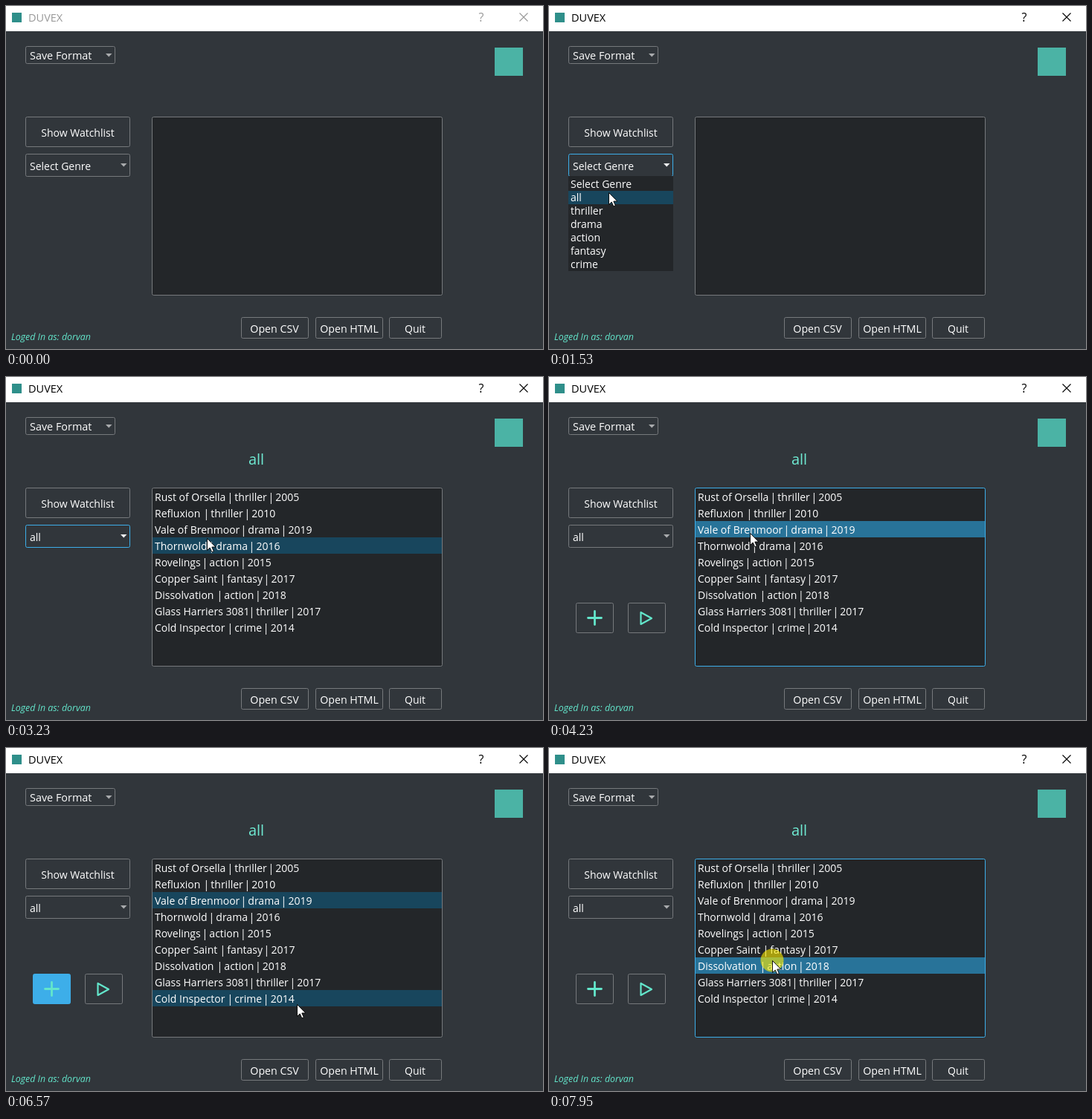
An HTML page for the animation above (8 s loop, 722 by 462 pixels).

```html
<!DOCTYPE html>
<html lang="en">
<head>
<meta charset="utf-8">
<title>Watchlist</title>
<style>
html, body { margin: 0; width: 100%; height: 100%; overflow: hidden; background: #31363b; }
svg { display: block; }
#stage { width: 100vw; height: 100vh; }
text { font: 14px "Open Sans", "Noto Sans", sans-serif; fill: #fff; white-space: pre; }
.mid { text-anchor: middle; }
.open { font-size: 14.2px; }
.box { fill: #31363b; stroke: #76797c; }
.box.hot { stroke: #3daee9; }
.box.on { fill: #3daee9; stroke: #3daee9; }
.dark { fill: #232629; }
.arrow { fill: #a9abad; }
.hot + .arrow { fill: #eff0f1; }
.icon { fill: none; stroke: #63e6cb; stroke-linecap: round; stroke-linejoin: round; }
#bar text { fill: #000; }
#bar path { fill: none; stroke: #000; stroke-width: 1.1; }
#bar.idle text { fill: #999; }
#bar.idle path { stroke: #999; }
</style>
</head>
<body>
<svg id="stage" viewBox="0 0 722 462">
  <rect width="722" height="462" fill="#31363b"/>
  <g id="bar">
    <rect width="722" height="34" fill="#fff"/>
    <rect x="8" y="9" width="13" height="13" fill="#2f8f8a"/>
    <text x="30" y="21" style="font-size:14.5px">DUVEX</text>
    <text class="mid" x="639" y="21" style="font-size:16px">?</text>
    <path d="M690.5 9.5l11 11m0-11l-11 11"/>
  </g>
  <rect x="657" y="56" width="38" height="38" fill="#4bb3a5"/>

  <rect class="box" x="26.5" y="54.5" width="120" height="23" rx="2"/>
  <path class="arrow" d="M134 64h8.5l-4.25 4.5z"/>
  <text x="32" y="72" style="font-size:14.4px">Save Format</text>
  <rect class="box" x="26.5" y="149.5" width="140" height="40" rx="2"/>
  <text class="mid" x="96.5" y="176">Show Watchlist</text>
  <rect class="box" id="combo" x="26.5" y="199.5" width="140" height="30" rx="2"/>
  <path class="arrow" d="M154 212h8.5l-4.25 4.5z"/>
  <text id="genre" x="32" y="221">Select Genre</text>

  <text class="mid" id="heading" x="336.5" y="118" style="font-size:20px;fill:#6febd3">all</text>
  <rect class="box" id="list" x="196.5" y="149.5" width="390" height="240" rx="2" style="fill:#232629"/>
  <g id="rows"></g>

  <g id="tools">
    <rect class="box" id="plus" x="36.5" y="304.5" width="50" height="40" rx="2"/>
    <path class="icon" stroke-width="2.8" d="M52.5 324.5h18m-9-9v18"/>
    <rect class="box" x="106.5" y="304.5" width="50" height="40" rx="2"/>
    <path class="icon" stroke-width="2.2" d="M123.5 317v16l14.5-8z"/>
  </g>

  <rect class="box" id="csv" x="316.5" y="419.5" width="90" height="28" rx="2"/>
  <text class="mid open" x="361" y="440">Open CSV</text>
  <rect class="box" x="416.5" y="419.5" width="90" height="28" rx="2"/>
  <text class="mid open" x="461.5" y="440">Open HTML</text>
  <rect class="box" x="515.5" y="419.5" width="70" height="28" rx="2"/>
  <text class="mid" x="550" y="440">Quit</text>
  <text x="7" y="450" style="font-size:12.4px;font-style:italic;fill:#63e6cb">Loged In as: dorvan</text>

  <svg id="popup" x="26" y="229" width="141" height="128">
    <rect class="dark" width="141" height="128"/>
    <g id="items"></g>
  </svg>
  <g id="cursor">
    <circle id="ring" r="15.5" fill="#ffee00" fill-opacity=".6"/>
    <path d="M.5 .5V16.5L4.2 13 6.8 18.8 9.3 17.7 6.8 12H11.8Z" fill="#fff" stroke="#000" stroke-width=".9"/>
  </g>
</svg>
<script>
const LOOP = 8000;
const $ = id => document.getElementById(id);

// title, genre, year, x of the first separator
const films = [
  ['Rust of Orsella', 'thriller', 2005, 301],
  ['Refluxion', 'thriller', 2010, 269],
  ['Vale of Brenmoor', 'drama', 2019, 319],
  ['Thornwold', 'drama', 2016, 276],
  ['Rovelings', 'action', 2015, 267],
  ['Copper Saint', 'fantasy', 2017, 291],
  ['Dissolvation', 'action', 2018, 287],
  ['Glass Harriers 3081', 'thriller', 2017, 330],
  ['Cold Inspector', 'crime', 2014, 301]
];
const genres = ['Select Genre', 'all', 'thriller', 'drama', 'action', 'fantasy', 'crime'];

$('rows').innerHTML = films.map(([title, genre, year, x], i) => {
  const top = 150 + 22 * i;
  return `<rect x="197" y="${top}" width="389" height="22"/>` +
    `<text x="200" y="${top + 17}">${title}</text>` +
    `<text x="${x - 3.5}" y="${top + 17}">|<tspan dx="-1.5"> ${genre} </tspan>` +
    `<tspan dx="-2">|</tspan><tspan dx="-1.5"> ${year}</tspan></text>`;
}).join('');
$('items').innerHTML = genres.map((g, i) =>
  `<rect y="${18 * i}" width="141" height="18"/><text x="3" y="${18 * i + 14}">${g}</text>`).join('');
const rowBars = $('rows').querySelectorAll('rect');
const itemBars = $('items').querySelectorAll('rect');

// start, end, steps, from, bend, to
const moves = [
  [120, 750, 9, [472, 411], [230, 250], [91, 225]],
  [1150, 1680, 8, [91, 225], [88, 246], [77, 254]],
  [2460, 3230, 11, [77, 254], [180, 252], [270, 217]],
  [3690, 3840, 3, [270, 217], [270, 213], [270, 210]],
  [4610, 5070, 7, [270, 210], [190, 250], [67, 332]],
  [6020, 6570, 8, [67, 332], [180, 318], [391, 345]],
  [7030, 7270, 4, [391, 345], [385, 400], [362, 426]],
  [7340, 7720, 6, [362, 426], [320, 350], [300, 286]]
];
const clicks = [[900, 990], [1760, 1840], [4150, 4230], [5470, 5620], [7870, LOOP]];

const ease = u => u * u * (3 - 2 * u);
const within = (t, a, b) => t >= a && t < b;
const show = (id, on) => { $(id).style.display = on ? '' : 'none'; };
const mark = (id, name, on) => $(id).classList.toggle(name, on);

// The pointer moves in steps, like a screen recording.
function pointer(t) {
  let move = moves[0];
  for (const m of moves) if (t >= m[0]) move = m;
  const [start, end, n, a, b, c] = move;
  const k = Math.floor((t - start) / (end - start) * (n - 1) + 1e-6);
  const raw = move === moves[0] ? k / (n - 1) : (k + 1) / n;
  const u = ease(Math.max(0, Math.min(1, raw)));
  return [0, 1].map(i => Math.round((1 - u) ** 2 * a[i] + 2 * u * (1 - u) * b[i] + u * u * c[i]));
}

function draw(t) {
  const [x, y] = pointer(t);
  show('cursor', t >= 120);
  $('cursor').setAttribute('transform', `translate(${x} ${y})`);
  show('ring', clicks.some(([a, b]) => within(t, a, b)));

  mark('bar', 'idle', t < 900);
  const overCombo = within(x, 26, 167) && within(y, 199, 230);
  mark('combo', 'hot', t < 4150 && (t >= 900 || (t >= 120 && overCombo)));
  $('genre').textContent = t < 1840 ? genres[0] : genres[1];

  show('popup', within(t, 990, 1840));
  const high = t < 1070 ? 49 : 128;
  $('popup').setAttribute('height', high);
  $('items').setAttribute('transform', `translate(0 ${high - 126})`);
  const item = Math.max(0, Math.floor((y - 231) / 18));
  itemBars.forEach((bar, i) => bar.setAttribute('fill', i === item ? '#18465d' : 'none'));

  const loaded = t >= 1920;
  show('heading', loaded);
  show('rows', loaded);
  const focus = within(t, 4150, 5470) || t >= 7950;
  const chosen = t < 4150 ? -1 : t < 7950 ? 2 : 6;
  const over = within(x, 197, 586) ? Math.floor((y - 150) / 22) : -1;
  mark('list', 'hot', focus);
  rowBars.forEach((bar, i) => bar.setAttribute('fill',
    i === chosen && focus ? '#287399' : i === chosen || i === over ? '#18465d' : 'none'));

  show('tools', t >= 4230);
  mark('plus', 'hot', within(x, 36, 87) && within(y, 304, 345));
  mark('plus', 'on', within(t, 5470, 7950));
  mark('csv', 'hot', t > 7000 && within(x, 316, 407) && within(y, 419, 448));
}

function tick() {
  draw(performance.now() % LOOP);
  requestAnimationFrame(tick);
}
tick();
</script>
</body>
</html>
```
